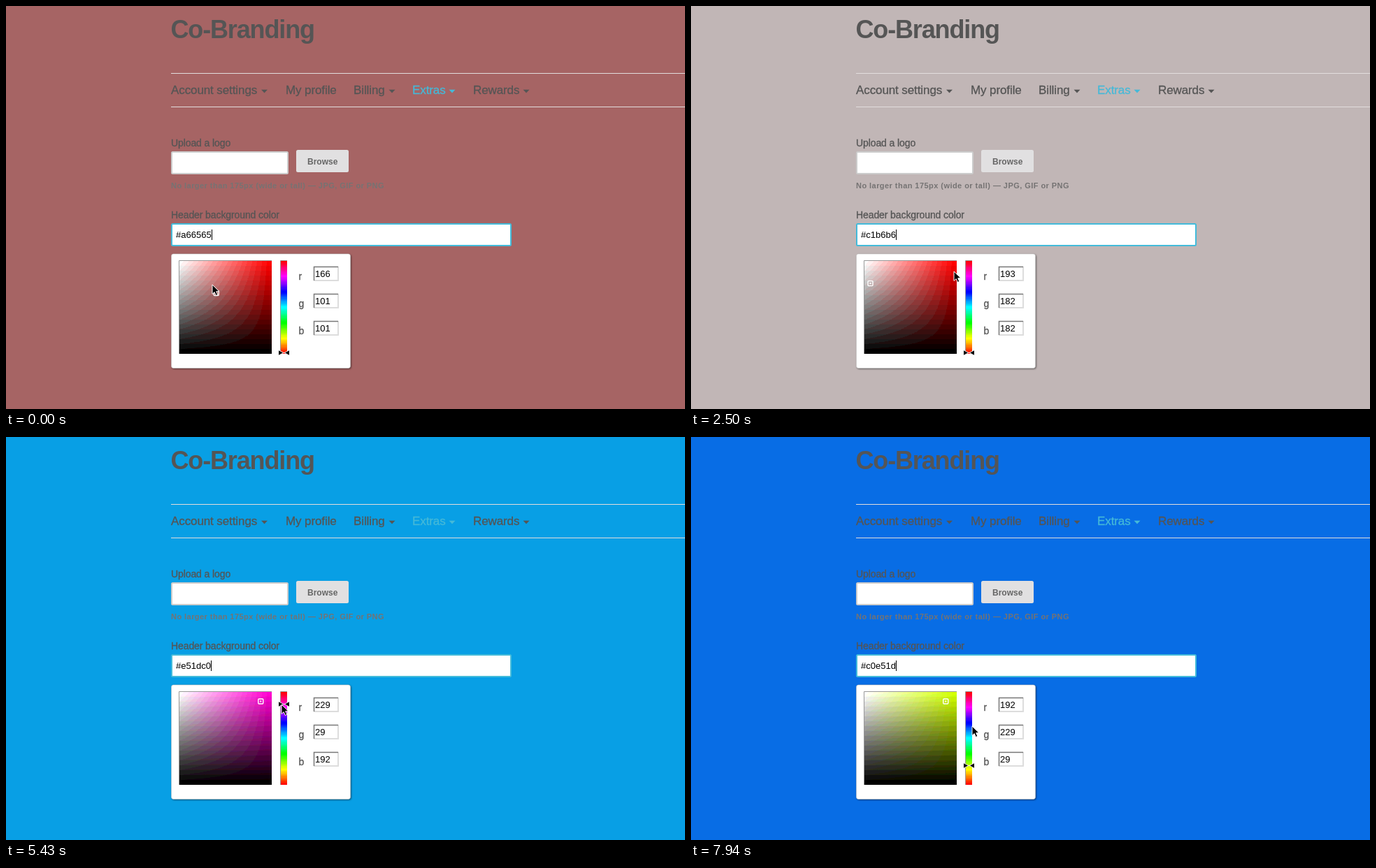
These frames come from a looping animation (971x577 px, 8 s). An HTML page:

```html
<!DOCTYPE html>
<html lang="en">
<head>
<meta charset="utf-8">
<title>Co-Branding</title>
<style>
  html, body { margin: 0; width: 100%; height: 100%; overflow: hidden; }
  svg { display: block; width: 971px; height: 577px; font-family: "Liberation Sans", Arial, sans-serif; }
  text { fill: #555; }
  .title { font-size: 36px; font-weight: bold; letter-spacing: -1.15px; }
  .nav { font-size: 17px; letter-spacing: -.1px; stroke: #555; stroke-width: .3px; }
  .label { font-size: 14px; letter-spacing: -.1px; stroke: #555; stroke-width: .3px; }
  .hint { font-size: 11px; font-weight: bold; letter-spacing: .45px; fill: #757373; }
  .button { font-size: 12px; font-weight: bold; fill: #666; }
  .value { font-size: 13px; fill: #000; }
  .arrow { fill: #555; }
  .active { fill: #45b9d8; }
  .nav.active { stroke: #45b9d8; }
  .panel { filter: drop-shadow(1px 1px 1px rgba(0, 0, 0, .5)); }
</style>
</head>
<body>
<svg viewBox="0 0 971 577">
  <defs>
    <linearGradient id="white"><stop stop-color="#fff"/><stop offset="1" stop-color="#fff" stop-opacity="0"/></linearGradient>
    <linearGradient id="black" x2="0" y2="1"><stop stop-opacity="0"/><stop offset="1"/></linearGradient>
    <linearGradient id="hues" x2="0" y2="1"></linearGradient>
    <filter id="bands" x="0" y="0" width="1" height="1" color-interpolation-filters="sRGB">
      <feComponentTransfer><feFuncR type="discrete"/><feFuncG type="discrete"/><feFuncB type="discrete"/></feComponentTransfer>
    </filter>
  </defs>

  <rect id="page" width="971" height="577"/>
  <text class="title" x="235.500" y="46">Co-Branding</text>
  <path d="M236 96.500H971M236 144.500H971" stroke="#e2dddd"/>
  <g id="menu"></g>

  <text class="label" x="236" y="201">Upload a logo</text>
  <rect x="237" y="209" width="166" height="31" rx="1.500" fill="#fff" stroke="#ccc" stroke-width="2"/>
  <rect x="415" y="206" width="75" height="32" rx="2.500" fill="#e1e0e1"/>
  <text class="button" x="431" y="227">Browse</text>
  <text class="hint" x="236" y="261">No larger than 175px (wide or tall) — JPG, GIF or PNG</text>

  <text class="label" x="236" y="304">Header background color</text>
  <rect x="237" y="312" width="485" height="31" rx="1.500" fill="#fff" stroke="#43bbda" stroke-width="2"/>
  <text class="value" id="hex" x="243" y="332"></text>
  <path id="caret" d="M.5 320v15" stroke="#000"/>

  <rect class="panel" x="236.500" y="355" width="256" height="163.500" rx="3" fill="#fff" stroke="#ccc" stroke-width=".6"/>
  <g filter="url(#bands)">
    <rect id="tone" x="248" y="365" width="132" height="133"/>
    <rect x="248" y="365" width="132" height="133" fill="url(#white)"/>
    <rect x="248" y="365" width="132" height="133" fill="url(#black)"/>
    <rect x="393" y="365" width="9" height="133" fill="url(#hues)"/>
  </g>
  <path d="M247.500 498V364.500H380M392.500 498V364.500H402" fill="none" stroke="#999"/>
  <g id="channels"></g>

  <g id="spot" fill="none">
    <rect x="-3.500" y="-3.500" width="7" height="7" rx="1" stroke="#fff" stroke-width="1.400"/>
    <rect x="-1" y="-1" width="2" height="2" fill="#fff"/>
  </g>
  <g id="slider">
    <path d="M389.700-4L398 0 389.700 4zM405.300-4L397 0 405.300 4z" fill="#fff"/>
    <path d="M390-3.300L396 0 390 3.300zM405-3.300L399 0 405 3.300z"/>
  </g>
  <path id="cursor" d="M0 0V13.500L3.200 10.600 5.300 15.500 7.800 14.400 5.700 9.700H10z" stroke="#fff" stroke-linejoin="round"/>
</svg>
<script>
  const LOOP = 8000, FIRST = 420, STEP = 208.8;
  const PAGE_LAG = 2, LAST_DRAG = 34;
  const $ = id => document.getElementById(id);

  // step, picked colour, cursor position
  const stops = [
    [-1, "a66565", 295, 399],
    [4, "6b3333", 317, 438],
    [6, "c84040", 338, 391],
    [8, "c1b6b6", 256, 394],
    [10, "c1b6b6", 376, 380],
    [13, "c1b6b6", 394, 490],
    [15, "b6bdc1", 394, 422],
    [16, "b6bdc1", 262, 394],
    [18, "396e8b", 332, 414],
    [21, "1d9fe5", 364, 375],
    [23, "1d9fe5", 394, 420],
    [24, "e51dc0", 394, 383],
    [29, "e51dc0", 394, 383],
    [31, "1de559", 399, 416],
    [32, "1d6de5", 394, 417],
    [34, "c0e51d", 394, 470],
    [35, "c0e51d", 394, 470],
    [36, "c0e51d", 402, 414]
  ].map(([step, hex, x, y]) => [step, ...parse(hex), x, y]);

  // hex colour to hue, strongest and weakest channel
  function parse(hex) {
    const [r, g, b] = hex.match(/../g).map(c => parseInt(c, 16));
    const max = Math.max(r, g, b), min = Math.min(r, g, b), d = max - min;
    const sector = max === r ? (g - b) / d + 6 : max === g ? (b - r) / d + 2 : (r - g) / d + 4;
    return [sector % 6 * 60, max, min];
  }

  function toRgb(hue, max, min) {
    return [5, 3, 1].map(n => {
      const k = (n + hue / 60) % 6;
      return Math.round(max - (max - min) * Math.max(0, Math.min(k, 4 - k, 1)));
    });
  }

  function poseAt(step) {
    const i = Math.max(1, stops.findIndex(stop => stop[0] >= step));
    const a = stops[i - 1], b = stops[i];
    const p = Math.max(0, (step - a[0]) / (b[0] - a[0]));
    return a.slice(1).map((v, n) => v + (b[n + 1] - v) * p);
  }

  // the page follows the picker late, and looks a little more saturated
  function pageColor(step) {
    const [hue, max, min] = poseAt(Math.min(step, LAST_DRAG) - PAGE_LAG);
    const deeper = min - 36 * (1 - min / max) ** 4;
    return toRgb(hue, max, min).map(c => c <= min + 1 ? Math.round(deeper) : c);
  }

  function build() {
    const items = [["Account settings", 236, 365], ["My profile", 400], ["Billing", 497, 547.5],
      ["Extras", 581, 633.5], ["Rewards", 668, 739.5]];
    $("menu").innerHTML = items.map(([name, x, arrow]) => {
      const active = name === "Extras" ? "active" : "";
      const caret = arrow ? `<path class="arrow ${active}" d="M${arrow} 119.800h9l-4.500 4.700z"/>` : "";
      return `<text class="nav ${active}" x="${x}" y="126">${name}</text>${caret}`;
    }).join("");

    $("channels").innerHTML = ["r", "g", "b"].map((name, i) => `<g transform="translate(0 ${i * 39})">
      <text class="label" x="418.500" y="391.500">${name}</text>
      <path d="M440 393H475V373" fill="none" stroke="#ddd" stroke-width="2"/>
      <path d="M440.500 393V373.500H475" fill="none" stroke="#777" stroke-width="1.500"/>
      <text class="value channel" x="442" y="387.500"></text></g>`).join("");

    $("hues").innerHTML = ["red", "magenta", "blue", "cyan", "lime", "yellow", "red"]
      .map((c, i) => `<stop offset="${i / 6}" stop-color="${c}"/>`).join("");

    const levels = Array.from({ length: 19 }, (_, i) => i / 18).join(" ");
    document.querySelectorAll("#bands feComponentTransfer > *").forEach(f => f.setAttribute("tableValues", levels));
  }

  const move = (id, x, y) => $(id).setAttribute("transform", `translate(${x} ${y})`);
  const css = rgb => `rgb(${rgb})`;

  function draw(step) {
    const [hue, max, min, x, y] = poseAt(step);
    const rgb = toRgb(hue, max, min);
    $("page").style.fill = css(pageColor(step));
    $("tone").style.fill = css(toRgb(hue, 255, 0));
    $("hex").textContent = "#" + rgb.map(c => c.toString(16).padStart(2, "0")).join("");
    move("caret", Math.round(243 + $("hex").getComputedTextLength()), 0);
    document.querySelectorAll(".channel").forEach((el, i) => { el.textContent = rgb[i]; });
    move("spot", 249 + 132 * (1 - min / max), 365 + 132 * (1 - max / 255));
    move("slider", 0, 496.5 - 132 * hue / 360);
    move("cursor", Math.round(x), Math.round(y));
  }

  build();
  const begin = performance.now();
  let shown = null;
  function tick() {
    const t = (performance.now() - begin) % LOOP;
    const step = Math.max(-1, Math.floor((t - FIRST) / STEP + .08));
    if (step !== shown) draw(shown = step);
    requestAnimationFrame(tick);
  }
  tick();
</script>
</body>
</html>
```
